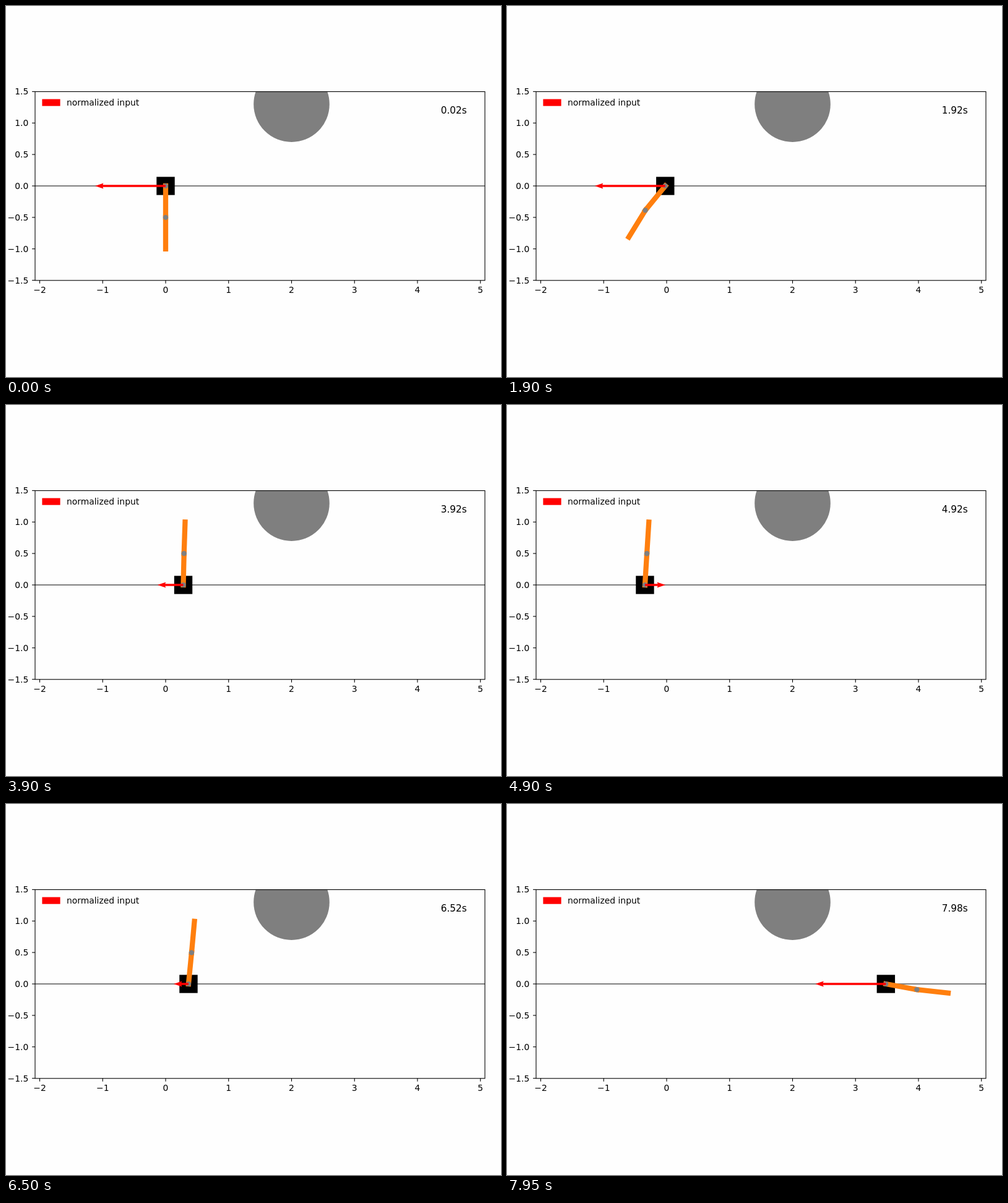
Recreate the animation shown at these times as an HTML page. Size 800 by 600 pixels, loop 8 s.

```html
<!DOCTYPE html>
<html lang="en">
<head>
<meta charset="utf-8">
<title>Double pendulum on a cart</title>
<style>
  html, body { margin: 0; width: 100%; height: 100%; overflow: hidden; background: #fefefe; }
  svg { display: block; width: 800px; height: 600px; }
  text { font: 13.89px "DejaVu Sans", sans-serif; fill: #000; }
  #clock { font-size: 15.28px; }
</style>
</head>
<body>
<svg viewBox="0 0 800 600">
  <clipPath id="plot"><rect x="47" y="138.5" width="727" height="305.3"/></clipPath>
  <g clip-path="url(#plot)">
    <circle cx="461.5" cy="158.7" r="61.3" fill="#7f7f7f"/>
    <path d="M47 291H774" stroke="#7f7f7f" stroke-width="2"/>
    <rect id="cart" y="276.3" width="29.4" height="29.4"/>
    <g stroke="#ff7f0e" stroke-width="8.3" stroke-linecap="square">
      <line id="upper"/><line id="lower"/>
    </g>
    <circle id="pivot" r="4" fill="#7f7f7f"/>
    <circle id="elbow" r="4.2" fill="#7f7f7f"/>
    <path id="arrow" fill="#f00"/>
  </g>
  <rect x="47" y="138.5" width="727" height="305.3" fill="none" stroke="#000" stroke-width="1.1"/>
  <g id="axes" stroke-width="1.1"></g>
  <rect x="58.4" y="150.6" width="29.2" height="11.1" fill="#f00"/>
  <text x="98" y="161">normalized input</text>
  <text id="clock" x="702.8" y="174"></text>
</svg>
<script>
const LOOP = 8000, STEP = 50;
const UNIT = 101.75, ORIGIN_X = 258, ORIGIN_Y = 291, LINK = UNIT / 2, FULL_INPUT = 114;

// Turning points of each swing: seconds, value, optional skew of the swing that ends there.
// Angles are in degrees from hanging down; the input runs from -1 to 1.
const CART = [[0, 0], [1.02, -1.07], [2.05, .035], [2.65, -.266], [3.75, .3], [5.15, -.398], [8.5, 4.017, 1.43]];
const UPPER = [[0, 0], [.53, 36], [1.5, -57], [2.75, 88, 1.3], [3.95, -182.6, 1.05], [6.5, -185.6], [8.3, 140, 1.54]];
const LOWER = [[0, 0], [.57, 36], [1.5, -51], [2.65, 95, 1.36], [3.95, -182.9, .96], [6.5, -185.2], [8.3, 140, 1.476]];
const INPUT = [[0, -1], [.45, -1], [.8, 1], [1.7, 1], [1.75, -1], [2.5, -1], [3.3, 1],
  [4.1, -.6], [4.9, .29], [6.5, -.21], [6.9, 1], [7.3, 1], [7.95, -1]];

const $ = id => document.getElementById(id);
const set = (node, attrs) => { for (const k in attrs) node.setAttribute(k, attrs[k]); };

// Half a cosine wave from one turning point to the next.
function swing(track, t) {
  const next = Math.max(1, track.findIndex(([end]) => t <= end));
  const [t0, from] = track[next - 1], [t1, to, skew = 1] = track[next];
  const phase = Math.PI * ((t - t0) / (t1 - t0)) ** skew;
  return from + (to - from) * (1 - Math.cos(phase)) / 2;
}

function arrowPath(x, length) {
  const dir = Math.sign(length), s = Math.min(1, Math.abs(length) / 13.5);
  const tip = x + length, neck = tip - dir * 12.3 * s, barb = tip - dir * 13.5 * s;
  const y = ORIGIN_Y, w = 1.75 * s, h = 4.6 * s;
  return `M${x} ${y - w}L${neck} ${y - w}L${barb} ${y - h}L${tip} ${y}` +
    `L${barb} ${y + h}L${neck} ${y + w}L${x} ${y + w}Z`;
}

function drawLink(node, x, y, degrees) {
  const a = degrees * Math.PI / 180;
  const x2 = x + LINK * Math.sin(a), y2 = y + LINK * Math.cos(a);
  set(node, { x1: x, y1: y, x2, y2 });
  return [x2, y2];
}

function draw(ms) {
  const t = ms / 1000;
  const x = ORIGIN_X + UNIT * swing(CART, t);
  set($("cart"), { x: x - 14.7 });
  const [ex, ey] = drawLink($("upper"), x, ORIGIN_Y, swing(UPPER, t));
  drawLink($("lower"), ex, ey, swing(LOWER, t));
  set($("pivot"), { cx: x, cy: ORIGIN_Y });
  set($("elbow"), { cx: ex, cy: ey });
  set($("arrow"), { d: arrowPath(x, FULL_INPUT * swing(INPUT, t)) });
  // The clock counts in whole 20 ms ticks.
  $("clock").textContent = ((Math.round(ms / 20) + 1) * .02).toFixed(2) + "s";
}

function drawAxes() {
  const label = v => v.replace("-", "\u2212");
  let out = "";
  for (let v = -2; v <= 5; v++) {
    const x = ORIGIN_X + UNIT * v;
    out += `<path d="M${x} 443.8v4.9" stroke="#000"/>` +
      `<text x="${x}" y="464" text-anchor="middle">${label(String(v))}</text>`;
  }
  for (let v = -1.5; v <= 1.5; v += .5) {
    const y = ORIGIN_Y - UNIT * v;
    out += `<path d="M47 ${y}h-4.9" stroke="#000"/>` +
      `<text x="36.3" y="${y + 5}" text-anchor="end">${label(v.toFixed(1))}</text>`;
  }
  $("axes").innerHTML = out;
}

drawAxes();
draw(0);
const start = performance.now();
function tick() {
  const ms = Math.max(0, performance.now() - start) % LOOP;
  draw(Math.floor(ms / STEP) * STEP);
  requestAnimationFrame(tick);
}
requestAnimationFrame(tick);
</script>
</body>
</html>
```
